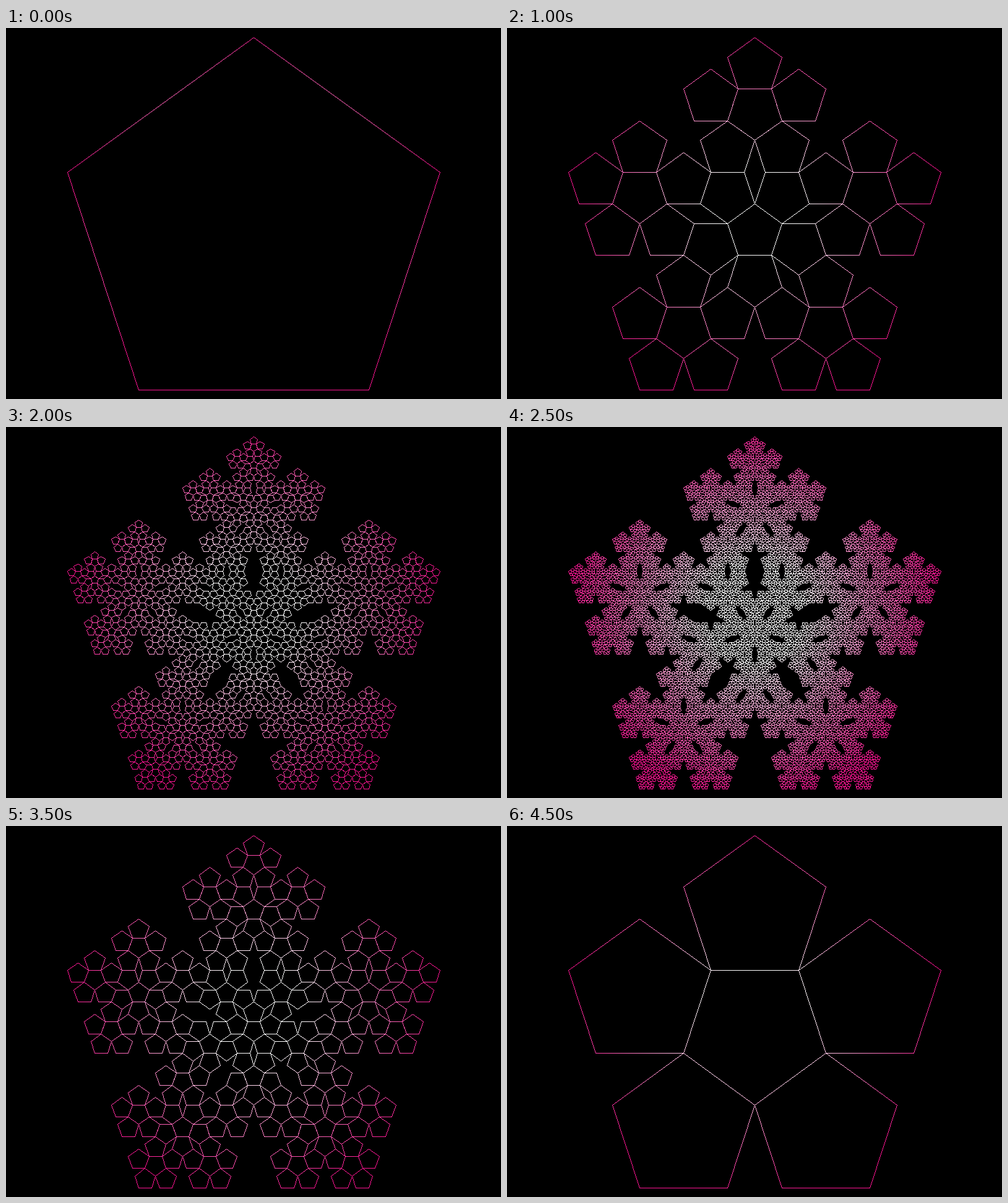
Write an HTML page with a canvas that moves like this. It is 800 by 600 pixels and loops after 5000 ms.

```html
<!DOCTYPE html>
<html lang="en">
<head>
<meta charset="utf-8">
<title>Pentagon fractal</title>
<style>
  html, body { margin: 0; width: 100%; height: 100%; overflow: hidden; background: #000; }
  canvas { display: block; }
</style>
</head>
<body>
<canvas id="stage" width="800" height="600"></canvas>
<script>
const W = 800, H = 600, STEP = 500, DEPTH = 5;
const RATIO = (3 - Math.sqrt(5)) / 2;
const INNER = [255, 255, 255], OUTER = [255, 20, 147];
const FADE_START = 80, FADE_END = 300;
const RX = 316.4, RY = 315.2, TOP = 15;
const ROOT = Array.from({ length: 5 }, (_, i) => {
  const a = i * Math.PI * 2 / 5;
  return [W / 2 + RX * Math.sin(a), TOP + RY * (1 - Math.cos(a))];
});
const ctx = document.getElementById('stage').getContext('2d');

const toward = (a, b) => [a[0] + (b[0] - a[0]) * RATIO, a[1] + (b[1] - a[1]) * RATIO];

// One small copy at each corner and an inverted one in the middle.
function split(p) {
  const corners = p.map(v => p.map(w => toward(v, w)));
  const middle = p.map((v, i) => toward(v, p[(i + 2) % 5]));
  return [...corners, middle];
}

function plot(image, x, y) {
  const d = Math.hypot(x - W / 2, y - H / 2);
  const k = Math.min(1, Math.max(0, (d - FADE_START) / (FADE_END - FADE_START)));
  const at = (y * W + x) * 4;
  for (let c = 0; c < 3; c++) image.data[at + c] = INNER[c] + (OUTER[c] - INNER[c]) * k;
}

// Bresenham: hard one-pixel line without smoothing.
function line(image, a, b) {
  let [x, y] = a.map(Math.round);
  const [x1, y1] = b.map(Math.round);
  const dx = Math.abs(x1 - x), dy = Math.abs(y1 - y);
  const sx = Math.sign(x1 - x), sy = Math.sign(y1 - y);
  let err = dx - dy;
  plot(image, x, y);
  while (x !== x1 || y !== y1) {
    const e = 2 * err;
    if (e > -dy) { err -= dy; x += sx; }
    if (e < dx) { err += dx; y += sy; }
    plot(image, x, y);
  }
}

function render(pentagons) {
  const image = ctx.createImageData(W, H);
  for (let i = 3; i < image.data.length; i += 4) image.data[i] = 255;
  for (const p of pentagons) p.forEach((v, i) => line(image, v, p[(i + 1) % 5]));
  return image;
}

const levels = [];
let pentagons = [ROOT];
for (let d = 0; d <= DEPTH; d++) {
  levels.push(render(pentagons));
  if (d < DEPTH) pentagons = pentagons.flatMap(split);
}

let shown = -1;
const start = performance.now();
function draw() {
  const step = Math.floor((performance.now() - start) / STEP) % (2 * DEPTH);
  const level = DEPTH - Math.abs(DEPTH - step);
  if (level !== shown) ctx.putImageData(levels[shown = level], 0, 0);
  requestAnimationFrame(draw);
}
draw();
</script>
</body>
</html>
```
